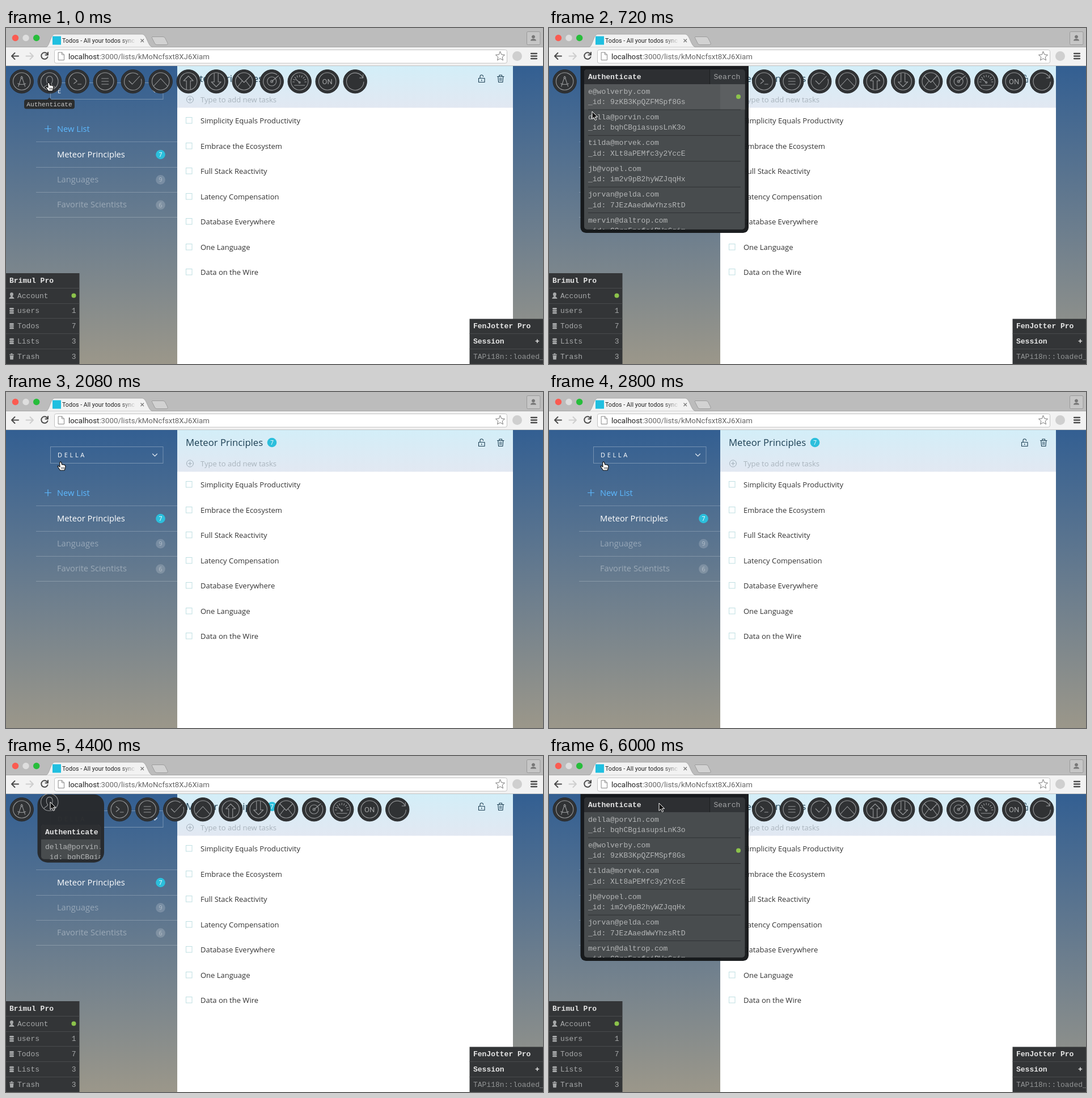
Write an HTML page that moves like this. It is 947x592 px and loops after 6080 ms.

```html
<!DOCTYPE html>
<html lang="en">
<head>
<meta charset="utf-8">
<title>Todos</title>
<style>
html, body { margin: 0; width: 100%; height: 100%; overflow: hidden; background: #fff; }
svg { display: block; }
text { white-space: pre; }
.open { font-family: "Open Sans", sans-serif; }
.ui { font-family: Roboto, sans-serif; }
.mono { font: 13px "Liberation Mono", monospace; }
.bold { font-weight: 700; fill: #e6e6e6; }
.line { fill: none; stroke-linecap: round; stroke-linejoin: round; }
.mid { text-anchor: middle; }
.end { text-anchor: end; }
</style>
</head>
<body>
<svg id="stage" width="947" height="592" viewBox="0 0 947 592">
  <defs>
    <linearGradient id="sky" x2="0" y2="1"><stop stop-color="#335f92"/><stop offset="1" stop-color="#9b978a"/></linearGradient>
    <linearGradient id="head" x2="0" y2="1"><stop stop-color="#d3eef8"/><stop offset="1" stop-color="#e2e8f2"/></linearGradient>
    <linearGradient id="fade" x2="1" y2="0"><stop offset=".8" stop-color="#222"/><stop offset="1" stop-color="#222" stop-opacity=".1"/></linearGradient>
    <clipPath id="page"><rect y="67" width="947" height="525"/></clipPath>
    <clipPath id="inner"><rect id="innerBox" x="62" rx="5"/></clipPath>
  </defs>

  <rect y="67" width="947" height="525" fill="url(#sky)"/>

  <g class="open" font-size="14.7">
    <rect x="78.5" y="96.5" width="198.5" height="29" fill="none" stroke="#fff" stroke-opacity=".3"/>
    <text id="user" x="91" y="115" font-size="11" letter-spacing="3.7" fill="#fff"></text>
    <path class="line" d="M258.5 109l4 4 4-4" stroke="#e6edf3" stroke-width="1.1"/>
    <path class="line" d="M68.5 177.5h11M74 172v11" stroke="#5db9ff" stroke-width="1.2"/>
    <text x="90" y="183" fill="#5db9ff">New List</text>
    <g id="lists"></g>
  </g>

  <rect x="302" y="67" width="592" height="525" fill="#fff"/>
  <rect x="302" y="67" width="592" height="73.5" fill="url(#head)"/>
  <g class="open" font-size="13">
    <text x="317" y="95" font-size="16.7" fill="#1c3f53">Meteor Principles</text>
    <circle cx="469" cy="89" r="8.3" fill="#2cbfdc"/>
    <text class="mid" x="469" y="93" font-size="10.5" fill="#fff">7</text>
    <g class="line" stroke="#1c3f53" stroke-width="1.1">
      <path d="M833.5 88.500h10.500v7h-10.500zM836 88v-2.500a2.800 2.800 0 0 1 5.600 0M838.800 91v2"/>
      <path d="M866.500 85.500h11.500M870 85v-2h4.500v2M867.800 86l.8 9.500h7.300l.8-9.500"/>
      <path d="M870.700 88v5M872.200 88v5M873.800 88v5" stroke-width=".7"/>
    </g>
    <g class="line" stroke="#9fadb8"><circle cx="324.5" cy="126" r="6"/><path d="M321.500 126h6M324.500 123v6"/></g>
    <text x="343" y="130.5" fill="#a9b4bd">Type to add new tasks</text>
    <g id="tasks" fill="#333"></g>
  </g>

  <g class="ui">
    <rect width="947" height="34" fill="#bcbcbc"/>
    <rect y="33" width="947" height="34" fill="#f2f2f2"/>
    <path d="M0 33.500H72M257 33.500H947" stroke="#a6a6a6"/>
    <path d="M0 66.500H947" stroke="#c2c2c2"/>
    <path d="M70 34C77 33 78 13 85 11H241C249 13 250 33 259 34Z" fill="#f2f2f2" stroke="#a0a0a0" stroke-width=".8"/>
    <rect x="60" y="34" width="210" height="2" fill="#f2f2f2"/>
    <path d="M258 15.500h19q3 0 4 3l4 8q1 3-2 3h-17q-3 0-4-3l-4-8q-2-3 0-3z" fill="#d2d2d2" stroke="#989898" stroke-width=".9"/>
    <circle cx="16.5" cy="17.5" r="5.7" fill="#fb5b51"/>
    <circle cx="35" cy="17.5" r="5.7" fill="#dedede"/>
    <circle cx="53.7" cy="17.5" r="5.7" fill="#27bd3b"/>
    <rect x="82" y="14.5" width="15" height="15" fill="#20bfe0"/>
    <text x="99" y="26" font-size="10.7" fill="url(#fade)">Todos - All your todos sync</text>
    <path d="M237.500 19.500l5.500 5.500m0-5.500l-5.500 5.500" stroke="#777" stroke-width="1.2"/>
    <rect x="918.5" y="6.5" width="23.5" height="23" rx="2" fill="#c6c6c6" stroke="#999"/>
    <path d="M925 22.500q0-3.500 5-3.500t5 3.500zM930 12.500a3 3 0 1 1-.01 0" fill="#777"/>
    <g class="line" stroke-width="2" stroke="#4b4b4b">
      <path d="M22 49.500H10m5.500-5.500l-5.500 5.500 5.500 5.500"/>
      <path d="M35.500 49.500H48m-5.500-5.500l5.500 5.500-5.500 5.500" stroke="#cecece"/>
      <path d="M73 46a5.800 5.800 0 1 0 .5 5M74 43v4.500h-4.500"/>
      <path d="M926 45h10M926 49.500h10M926 54h10" stroke-width="2.3"/>
    </g>
    <rect x="85.5" y="38.5" width="798" height="23.5" rx="3" fill="#fff" stroke="#c3c3c3"/>
    <path class="line" d="M92.500 43h6l4 4v9.500h-10zM98.500 43v4h4" stroke="#888"/>
    <text x="110" y="54.5" font-size="13.3" fill="#222">localhost<tspan fill="#666">:3000/lists/kMoNcfsxt8XJ6Xiam</tspan></text>
    <path class="line" d="M871.500 41.500l2.300 5.300 5.700.6-4.300 3.800 1.300 5.600-5-3-5 3 1.300-5.600-4.300-3.800 5.700-.6z" stroke="#777"/>
    <circle cx="901.5" cy="49.5" r="8.5" fill="#cfcfcf"/>
  </g>

  <g id="tools" clip-path="url(#page)">
    <g id="left" class="mono" fill="#a6a8a9"></g>
    <g id="right" class="mono" fill="#a6a8a9"></g>
    <g id="first"></g>
    <g id="others"></g>
    <rect id="panel" x="55.5" opacity=".97"/>
    <g id="face"></g>
    <g clip-path="url(#inner)">
      <g id="body" class="mono" fill="#b4b6b7">
        <rect width="290" height="300" fill="#484c4e"/>
        <g id="content">
          <rect width="290" height="26" fill="#2d2f32"/>
          <rect x="221" width="70" height="26" fill="#323538"/>
          <path d="M221.500 0v26" stroke="#1c1e20"/>
          <text class="bold" x="7" y="17">Authenticate</text>
          <text x="228.5" y="17" fill="#a3a5a6">Search</text>
          <g id="hover"><rect y="26" width="290" height="44.5" fill="#545759"/><rect x="240" y="26" width="50" height="44.5" fill="#5c5f61"/></g>
          <g id="rows"></g>
        </g>
      </g>
    </g>
    <g id="tip">
      <path d="M76.500 122.500l4 4h-8z" fill="#2b2d2e"/>
      <rect x="32" y="126" width="89" height="16.5" rx="4" fill="#2b2d2e"/>
      <text class="mono mid" x="76.5" y="138" style="font-size:11.2px" fill="#c8c8c8">Authenticate</text>
    </g>
  </g>

  <g id="cursor">
    <path id="arrow" d="M0 0V13.500L3.200 10.500 5.400 15.500 7.700 14.500 5.500 9.700H9.700Z" fill="#111" stroke="#fff"/>
    <g id="hand">
      <path d="M-1.500 1.500Q0-1 1.700 1.300L2.700 5 4.500 4.800 6 5.300 8 6 9 8 8.300 12 7 15H-.5L-3.500 10.500-5 8Q-4.500 6.500-3 7.500L-1 9Z" fill="#fff" stroke="#111" stroke-width="1.2" stroke-linejoin="round"/>
      <path d="M2 9.500v3M4.200 9.500v3M6.300 9.500v3" stroke="#111" stroke-width=".9"/>
    </g>
  </g>
</svg>

<script>
const $ = id => document.getElementById(id);
const LOOP = 6080, STEP = 80;
const ORB = 43, GROW = 253.5;

// Page content
const badge = (y, n, on) => `<circle cx="272.5" cy="${y}" r="8.3" fill="${on ? '#2cbfdc' : '#fff'}" opacity="${on ? 1 : .18}"/>
  <text class="mid" x="272.5" y="${y + 4}" font-size="10.5" fill="#fff" opacity="${on ? 1 : .4}">${n}</text>`;

$('lists').innerHTML = '<path d="M53 200.500H302" stroke="#fff" stroke-opacity=".22"/>' +
  [['Meteor Principles', 7], ['Languages', 9], ['Favorite Scientists', 6]].map(([name, n], i) => {
    const y = 223 + i * 44.4;
    return `<text x="90" y="${y + 4.5}" fill="#fff" opacity="${i ? .36 : 1}">${name}</text>${badge(y, n, !i)}
      <path d="M53 ${Math.round(y + 21.5) + .5}H302" stroke="#fff" stroke-opacity=".22"/>`;
  }).join('');

$('tasks').innerHTML = ['Simplicity Equals Productivity', 'Embrace the Ecosystem', 'Full Stack Reactivity',
  'Latency Compensation', 'Database Everywhere', 'One Language', 'Data on the Wire'].map((name, i) => {
    const y = Math.round(163.4 + i * 44.5);
    return `<rect x="317.5" y="${y - 5.5}" width="10.5" height="10.5" fill="#fff" stroke="#bfdfe2"/>
      <text x="343" y="${y + 4.5}">${name}</text>`;
  }).join('');

// Corner panels
const ROW = 26.8;
const slab = (x, y, n) => `<rect x="${x}" y="${y}" width="130" height="${592 - y}" fill="#333537"/>` +
  Array.from({length: n}, (_, i) => `<path d="M${x} ${Math.round(y + ROW * (i + 1) - 1) + .5}h130" stroke="#494b4d"/>`).join('');
const person = '<path d="M0-5.500c4 0 3.500 5 1.500 6.500 0 1.500 3 1.500 3 4.500h-9c0-3 3-3 3-4.500-2-1.500-2.500-6.500 1.500-6.500"/>';
const disks = [-3.7, 0, 3.7].map(y => `<rect x="-4" y="${y - 1.5}" width="8" height="3" rx="1.5"/>`).join('');
const bin = '<path d="M-4-4h2.500v-1.500h3V-4H4v1.300h-8zM-3.400-2h6.800L2.700 5.500h-5.400z"/>';

$('left').innerHTML = slab(-.5, 432, 5) + '<text class="bold" x="6" y="449">Brimul Pro</text>' +
  [['Account', '', person], ['users', 1, disks], ['Todos', 7, disks], ['Lists', 3, disks], ['Trash', 3, bin]].map(([name, n, icon], i) => {
    const y = 471.5 + i * ROW;
    return `<g transform="translate(10 ${y})">${icon}</g><text x="20" y="${y + 4}">${name}</text><text class="end" x="123.5" y="${y + 4}">${n}</text>`;
  }).join('') + '<circle cx="119.5" cy="471.5" r="4" fill="#8cc34b"/>';

$('right').innerHTML = slab(817.5, 512.5, 2) + `<text class="bold" x="824" y="529">FenJotter Pro</text>
  <text class="bold" x="824" y="556">Session</text><text class="bold" x="933" y="556">+</text>
  <text x="824" y="583" fill="#929495">TAPi18n::loaded_</text>`;

// Round buttons
const ring = '<circle r="15.2"/>';
const path = d => `<path d="${d}"/>`;
const ticks = Array.from({length: 9}, (_, i) => {
  const a = Math.PI * (1 + i / 8), c = Math.cos(a), s = Math.sin(a);
  return `M${c * 9} ${s * 9 + 1}L${c * 12} ${s * 12 + 1}`;
}).join('');
const user = ring + path('M-9.500 11C-8 7-3 8-3 4.500-7-1-6-9 0-9S7-1 3 4.500C3 8 8 7 9.500 11');
const icons = [
  ring + path('M-6 9L-1-5.500M6 9L1-5.500M-7 4Q0 7 7 4M0-9v1.500') + '<circle cy="-6.5" r="1.6"/>',
  user,
  ring + path('M-6-5l5.500 4.500-5.500 4.500M1 5h6'),
  ring + path('M-6-5H6M-6 0H6M-6 5H6'),
  path('M9-12A15.200 15.200 0 1 0 14.700-4M-7-1L-1 5 12-9'),
  ring + path('M-12 8L0-5 12 8'),
  ring + path('M-3.500 14V-1H-8.500L0-9.500 8.500-1H3.500V14'),
  ring + path('M-3.500-14V1H-8.500L0 9.500 8.500 1H3.500V-14'),
  ring + path('M-11-9.500L0 2 11-9.500M-11 9.500L-3-1M11 9.500L3-1'),
  path('M9-12A15.200 15.200 0 1 0 13.500-7M0 0L12-10') + '<circle r="8"/><circle r="2"/>',
  ring + path(ticks + 'M0 2L-7-4M-9 7H9') + '<circle cy="2" r="1.5"/>',
  ring + '<text class="ui mid" y="5" font-size="13" fill="#a0a2a3" stroke="none">ON</text>',
  path('M13.800-6A15.200 15.200 0 1 0 15.200 1M8-6h6v-6')
];
const glyph = (icon, x) => `<g transform="translate(${x} 94)" class="line" stroke="#96989a" stroke-width="1.1">${icon}</g>`;
const orb = i => {
  const x = 27.7 + 49 * i;
  return `<circle cx="${x}" cy="94.2" r="20.7" fill="#303234" stroke="#26282a"/>` + glyph(icons[i], x);
};
$('first').innerHTML = orb(0);
$('others').innerHTML = icons.map((_, i) => i > 1 ? orb(i) : '').join('');
$('face').innerHTML = glyph(user, 76.7);

// Account list
const PITCH = 45.4;
$('rows').innerHTML = [['e@wolverby.com', '9zKB3KpQZFMSpf8Gs'], ['della@porvin.com', 'bqhCBgiasupsLnK3o'],
  ['tilda@morvek.com', 'XLt8aPEMfc3y2YccE'], ['jb@vopel.com', 'im2v9pB2hyWZJqqHx'],
  ['jorvan@pelda.com', '7JEzAaedWwYhzsRtD'], ['mervin@daltrop.com', 'G9rn5nofsiPWg6qim']].map(([mail, id], i) =>
    `<g><text x="7" y="42.5">${mail}</text><text x="7" y="61">_id: ${id}</text>
     <path d="M7 71H276" stroke="#2f3234"/>${i ? '' : '<circle cx="272" cy="48" r="4" fill="#8cc34b"/>'}</g>`).join('');
const rows = [...$('rows').children];

// Timeline: [time, value...]
const open = [[320, 0], [400, .294], [480, .7], [560, .92], [640, 1], [1040, 1], [1200, .424], [1280, .16], [1360, 0],
  [4320, 0], [4400, .294], [4480, .7], [4560, .92], [4640, 1]];
const pointer = [[480, 75, 96], [720, 76, 147], [880, 78, 155], [1280, 78, 155], [1840, 96, 123],
  [3920, 96, 123], [4160, 78, 81], [4720, 78, 81], [5840, 194, 83]];

function at(keys, t) {
  const n = keys.findIndex(k => k[0] > t);
  if (n < 0) return keys[keys.length - 1].slice(1);
  if (!n) return keys[0].slice(1);
  const a = keys[n - 1], b = keys[n], u = (t - a[0]) / (b[0] - a[0]);
  return a.slice(1).map((v, i) => v + (b[i + 1] - v) * u);
}
const set = (el, attrs) => { for (const k in attrs) el.setAttribute(k, attrs[k]); };
const show = (id, on) => $(id).style.display = on ? '' : 'none';
const within = (t, a, b) => t >= a && t < b;

function draw(t) {
  const [p] = at(open, t), [x, y] = at(pointer, t);
  const closing = within(t, 1041, 1400), swapped = t > 1400;
  const top = 73 - 18 * p, bottom = 115.5 + 245.5 * p, bodyTop = 73 + 68 * (1 - p);
  const shade = [48, 50, 52].map(v => Math.round(v - 27 * p));

  set($('panel'), {y: top, width: ORB + GROW * p, height: bottom - top, rx: 21.5 - 12 * p, fill: `rgb(${shade})`});
  set($('innerBox'), {y: bodyTop, width: ORB + GROW * p - 13, height: Math.max(0, bottom - 6 - bodyTop)});
  set($('body'), {transform: `translate(62 ${bodyTop})`});
  set($('face'), {transform: `translate(0 ${-43 * p})`});
  set($('others'), {transform: `translate(${GROW * p} 0)`});
  show('content', !closing);

  rows.forEach((row, i) => {
    const slot = swapped && i < 2 ? 1 - i : i;
    set(row, {transform: `translate(0 ${slot * PITCH})`});
  });
  show('hover', within(t, 640, 1041));
  set($('hover'), {transform: `translate(0 ${t < 800 ? 0 : PITCH})`});

  show('tools', !within(t, 1840, 3360));
  show('tip', t < 320);
  $('user').textContent = t < 1120 ? 'E' : 'DELLA';

  const arrow = within(t, 480, 800) || t >= 4160;
  show('cursor', !within(t, 3280, 3920));
  show('arrow', arrow);
  show('hand', !arrow);
  set($('cursor'), {transform: `translate(${x} ${y})`});
}

const start = performance.now();
function tick() {
  const t = (performance.now() - start) % LOOP;
  draw(Math.floor(t / STEP) * STEP);
  requestAnimationFrame(tick);
}
tick();
</script>
</body>
</html>
```
